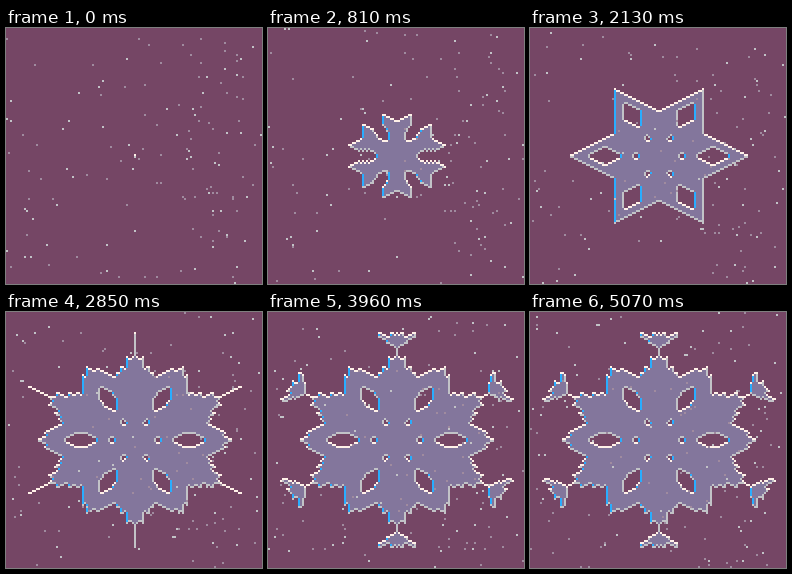
Write an HTML page with a canvas that moves like this. It is 256 px wide and 256 px high and loops after 5100 ms.

```html
<!DOCTYPE html>
<html>
<head>
<meta charset="utf-8">
<title>Snowflake</title>
<style>
html, body { margin: 0; width: 100%; height: 100%; overflow: hidden; background: #754665; }
canvas { display: block; width: 100%; height: 100%; image-rendering: pixelated; }
</style>
</head>
<body>
<canvas id="stage" width="128" height="128"></canvas>
<script>
const SIZE = 128, CENTER = 64, STEP = 30, LOOP = 170;
const MAUVE = '#754665', ICE = '#83769c', BLUE = '#29adff';
const WHITE = '#fff1e8', GRAY = '#c2c3c7', DIM = '#a08b9f';
const ctx = document.getElementById('stage').getContext('2d');

// Maps a pixel to a hexagonal lattice cell (odd columns sit half a cell lower)
// and folds it into one twelfth: p runs along a main arm, q along its neighbour.
function fold(x, y) {
  const dx = Math.abs(x - CENTER);
  const dy = Math.abs(y + 0.5 - CENTER) - (dx % 2 ? 0 : 0.5);
  const a = dy >= dx / 2 ? dx : dx / 2 + dy;
  const b = dy >= dx / 2 ? dy - dx / 2 : dx / 2 - dy;
  return [Math.max(a, b), Math.min(a, b)];
}

function armWidth(p) {
  if (p <= 5) return p;
  return Math.min(7, Math.max(4, p - 5));
}

function outerLimit(q) {
  if (q === 0) return 53;
  if (q <= 1) return 41;
  if (q <= 4) return 39;
  if (q <= 7) return 33;
  if (q <= 9) return 29;
  return q <= 19 ? 26 : 24;
}

// Step at which a cell freezes
function freezeStep(p, q) {
  const r = p + q;
  if (p <= 17) {
    const w = armWidth(p);
    if (q <= w) return r * 27 / 24;
    if (p === 6 && q > 4) return Infinity;
    if (q <= 9) return 27 + 26 * (q - w) / (9 - w);
    return p - q > 5 ? 80 - (p - q) : Infinity;
  }
  if (p <= 22) return Math.max(27 + r, 53 + (p - 17) * 1.5);
  if (p <= outerLimit(q)) return 71 + (p - 22) * 0.72 + q * 0.1;

  const fanTop = q <= 3 ? 52 : 49;
  if (q <= 9 && p >= 45 + q * 0.2 && p <= fanTop) return 95 + q * 3.3;
  return Infinity;
}

const frozenAt = [];
for (let y = 0; y < SIZE; y++)
  for (let x = 0; x < SIZE; x++) frozenAt.push(freezeStep(...fold(x, y)));

let seed = 71;
function random() {
  seed = (seed * 16807) % 2147483647;
  return seed / 2147483647;
}

const snow = Array.from({ length: 135 }, (_, i) => {
  const near = random() < 0.45;
  return {
    x: i % 3 ? random() * SIZE : 88 + random() * 40,
    y: random() * SIZE,
    drift: (random() - 0.5) * 0.2,
    fall: near ? 0.5 : 0.25,
    color: near ? GRAY : DIM
  };
});

function dot(x, y, color) {
  ctx.fillStyle = color;
  ctx.fillRect(x, y, 1, 1);
}

const wrap = v => ((Math.floor(v) % SIZE) + SIZE) % SIZE;

function draw(step) {
  ctx.fillStyle = MAUVE;
  ctx.fillRect(0, 0, SIZE, SIZE);
  const solid = (x, y) => frozenAt[y * SIZE + x] <= step;
  for (let y = 1; y < SIZE - 1; y++) {
    for (let x = 1; x < SIZE - 1; x++) {
      if (!solid(x, y)) continue;
      let color = ICE;
      if (!solid(x, y - 1)) color = WHITE;
      else if (!solid(x + 1, y) || !solid(x, y + 1)) color = GRAY;
      else if (!solid(x - 1, y)) color = BLUE;
      dot(x, y, color);
    }
  }
  for (const s of snow) dot(wrap(s.x + s.drift * step), wrap(s.y + s.fall * step), s.color);
}

const start = performance.now();
function tick() {
  draw(Math.floor((performance.now() - start) / STEP) % LOOP);
  requestAnimationFrame(tick);
}
tick();
</script>
</body>
</html>
```
